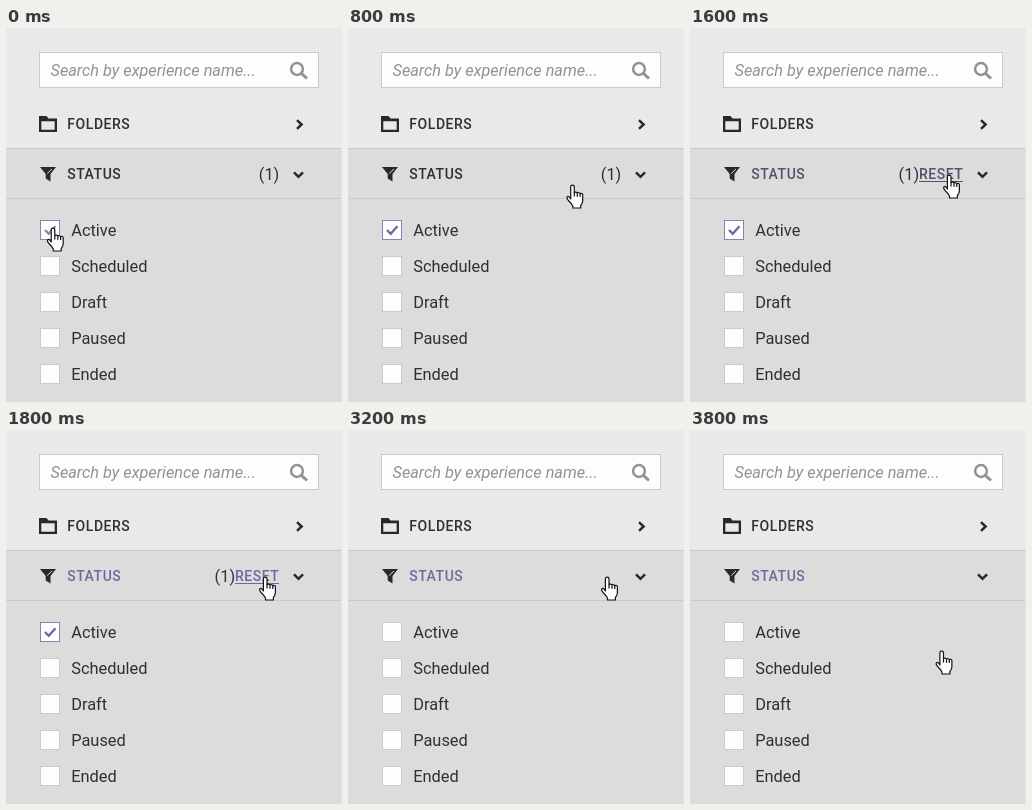
These frames come from a looping animation (336 px wide and 374 px high, 4.6 s). An HTML page:

```html
<!DOCTYPE html>
<html lang="en">
<head>
<meta charset="utf-8">
<title>Status filter reset</title>
<style>
  html, body { margin: 0; width: 100%; height: 100%; overflow: hidden; background: #e9e9ec; }
  svg { display: block; width: 336px; height: 374px; font-family: Roboto, sans-serif; font-size: 16.4px; fill: #303033; }
  .head { font-size: 14px; font-weight: 500; letter-spacing: .55px; }
  .line { fill: none; stroke: #29292b; stroke-width: 2.5; }
</style>
</head>
<body>
<svg viewBox="0 0 336 374">
  <rect width="336" height="374" fill="#e9e9ec"/>
  <rect y="120" width="336" height="254" fill="#dcdcdc"/>
  <path d="M0 120.5H335M0 170.5H335" stroke="#c9c9cb"/>
  <path d="M335.5 121V374" stroke="#e4e4e5"/>

  <rect x="33.5" y="24.5" width="279" height="35" fill="#fdfdfd" stroke="#c9c9cb"/>
  <text x="44.5" y="48" font-size="16.3" font-style="italic" fill="#929295">Search by experience name...</text>
  <g class="line" style="stroke:#929295">
    <circle cx="291" cy="41" r="5.9"/>
    <path d="M295.3 45.3L301 50.5" stroke-width="3"/>
  </g>

  <path d="M33 88h7.5l2 2.5H51V104H33ZM35.3 93.3v8.4h13.4v-8.4Z" fill="#29292b" fill-rule="evenodd"/>
  <text class="head" x="61.3" y="101">FOLDERS</text>
  <path class="line" d="M291 92.2L295.6 96.5L291 100.8"/>

  <path d="M34 139H50L44.5 146V153.5L39.7 150.5V146Z" fill="#29292b"/>
  <path d="M41.2 145.5L46 141" stroke="#dcdcdc"/>
  <text id="status" class="head" x="61.3" y="151">STATUS</text>
  <text id="count" y="152">(1)</text>
  <g id="reset">
    <text class="head" x="229" y="151">RESET</text>
    <rect x="229" y="153" width="44" height="1"/>
  </g>
  <path class="line" d="M288 144.3L292.5 148.8L297 144.3"/>

  <g id="options"></g>
  <path id="tick" d="M39 202L42.7 205.8L49.5 198.2" fill="none" stroke-width="2.3"/>

  <g id="hand" stroke="#111" stroke-width="1.2" stroke-linejoin="round">
    <path fill="#fff" d="M4.7 14.5V2.4a1.8 1.8 0 0 1 3.6 0V8a1.8 1.4 0 0 1 3 .5a1.7 1.4 0 0 1 2.8 .8a1.5 1.5 0 0 1 2.6 1.2V16q0 3-2 5v2.5H6.8V21.5Q5 18.5 2.4 16Q0 13 1.5 12Q3 11.4 4.7 14.5Z"/>
    <path fill="none" d="M8.3 8v4M11.3 8.7v3.6M14.1 9.5v3"/>
  </g>
</svg>
<script>
  const LOOP = 4600;
  const DARK = '#303033', MID = '#555069', PURPLE = '#75659f';
  const $ = id => document.getElementById(id);
  const set = (el, attrs) => {
    for (const key in attrs) el.setAttribute(key, attrs[key]);
    return el;
  };
  const make = (tag, attrs) =>
    $('options').appendChild(set(document.createElementNS('http://www.w3.org/2000/svg', tag), attrs));

  const boxes = ['Active', 'Scheduled', 'Draft', 'Paused', 'Ended'].map((label, i) => {
    const y = 192.5 + 36 * i;
    make('text', { x: 65.2, y: y + 15.5 }).textContent = label;
    return make('rect', { x: 34.5, y, width: 19, height: 19, fill: '#fdfdfd', stroke: '#cbcbcd' });
  });

  // Pointer stops: start time, x, y
  const stops = [
    [0, 40.5, 199.5], [400, 62, 196], [600, 135, 180], [800, 218, 156.5],
    [1000, 246.5, 149.5], [1200, 252.7, 146.5], [3400, 251, 183.5],
    [3600, 246.7, 214.5], [3800, 245.2, 220.5]
  ];

  function draw(t) {
    const [, x, y] = stops.filter(stop => stop[0] <= t).pop();
    const hovered = t >= 1600, cleared = t >= 3200;
    const accent = !hovered ? DARK : t < 1800 ? MID : PURPLE;
    const show = on => on ? 'visible' : 'hidden';

    set($('hand'), { transform: `translate(${x} ${y})` });
    set($('status'), { fill: accent });
    set($('reset'), { fill: accent, visibility: show(hovered && !cleared) });
    set($('count'), { x: hovered ? 208.6 : 252.8, visibility: show(!cleared) });
    set($('tick'), { stroke: t < 200 ? '#8d8b98' : '#75659f', visibility: show(!cleared) });
    set(boxes[0], { stroke: cleared ? '#cbcbcd' : '#8b82b2' });
  }

  const start = performance.now();
  function tick() {
    draw((performance.now() - start) % LOOP);
    requestAnimationFrame(tick);
  }
  tick();
</script>
</body>
</html>
```
